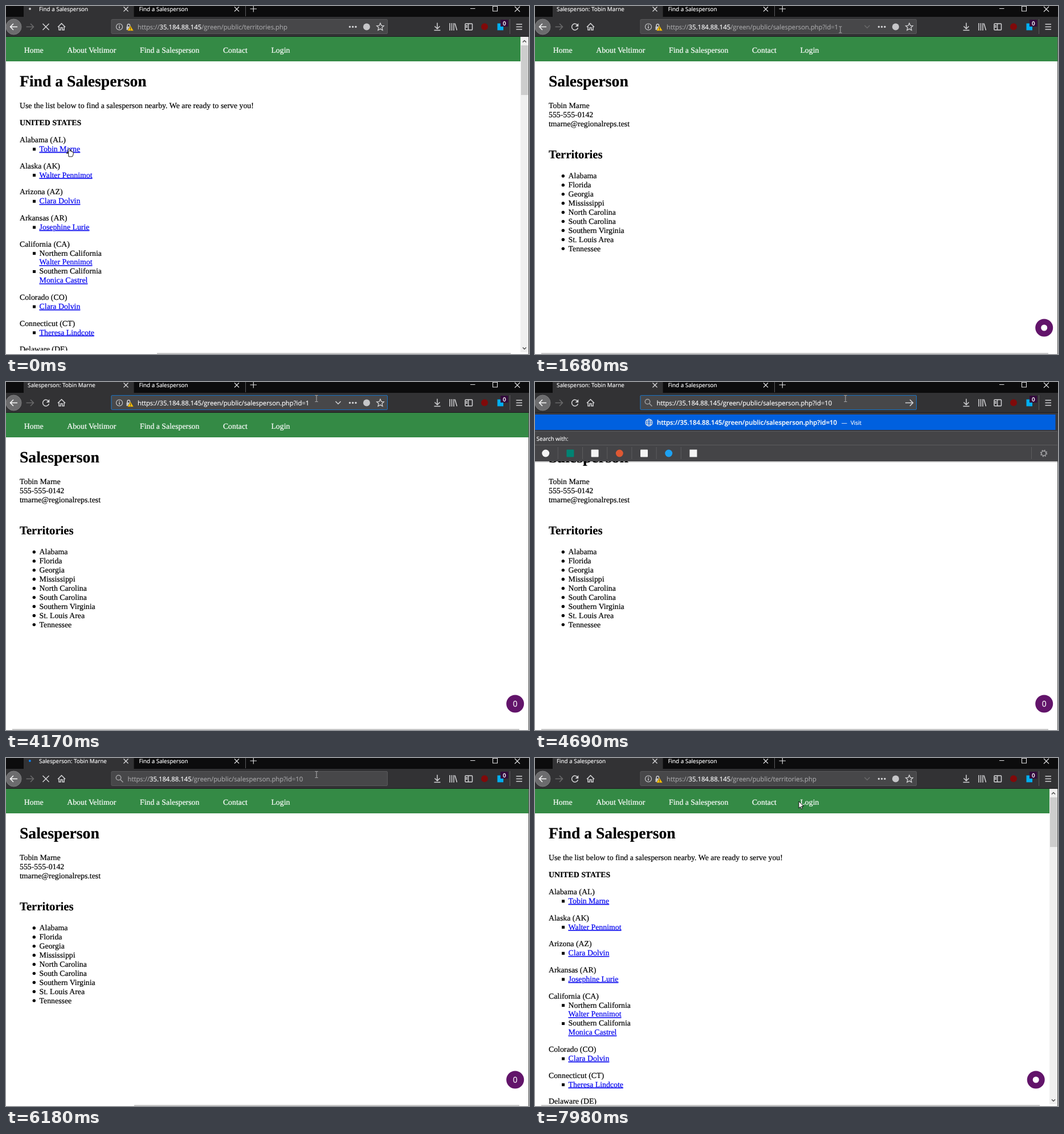
Recreate the animation shown at these times as an HTML page. Size 918 by 610 pixels, loop 8 s.

```html
<!DOCTYPE html>
<html lang="en">
<head>
<meta charset="utf-8">
<title>Find a Salesperson</title>
<style>
  html, body { margin: 0; width: 100%; height: 100%; overflow: hidden; background: #fff; }
  svg { display: block; width: 918px; height: 610px; text-rendering: geometricPrecision; }
  text { fill: currentColor; stroke: currentColor; stroke-width: .2px; }
  .page { font: 13.82px "Liberation Serif", serif; color: #000; }
  .page .nav { color: #fff; }
  .page .bold { font-weight: 700; }
  .page .h1 { font-size: 27.65px; font-weight: 700; }
  .page .h2 { font-size: 20.7px; font-weight: 700; }
  .page .link { color: #00e; text-decoration: underline; }
  .ui { font: 9.85px "Open Sans", sans-serif; color: #f9f9fa; }
  .url { font-size: 11.3px; }
  .dim { fill: #a2a2a4; stroke: #a2a2a4; }
  .line { fill: none; stroke: #d3d3d5; stroke-width: 1.5; }
  .thin { fill: none; stroke: #e4e4e6; stroke-width: 1.1; }
  .sep { stroke: #5c5c5e; }
</style>
</head>
<body>
<svg viewBox="0 0 918 610">
  <defs>
    <clipPath id="tabClip"><path d="M31 0H224.500V19H31Z"/></clipPath>
    <path id="cross" d="M-4-4 4 4M4-4-4 4"/>
    <g id="reload">
      <path class="line" d="M4.600-3A5.500 5.500 0 1 0 5.400 1.500"/>
      <path d="M6.300-6.300V-.600H.600Z" fill="#d3d3d5"/>
    </g>
    <path id="stop" class="line" d="M-5.500-5.500 5.500 5.500M5.500-5.500-5.500 5.500"/>
    <path id="chevron" class="line" d="M578.500 34 583 38.500 587.500 34"/>
  </defs>

  <g class="page">
    <path fill="#fff" d="M0 0H918V610H0Z"/>
    <g data-on="0-240 6330-8000" id="territories"></g>
    <g data-on="240-6330" id="salesperson"></g>
    <g id="badge">
      <circle r="15.500" fill="#62146a"/>
      <circle data-on="480-2410 6450-8000" r="5.500" fill="#fff"/>
      <text data-on="2410-6330" class="ui" y="5" text-anchor="middle" style="font-size:14px">0</text>
    </g>
    <path fill="#fff" d="M0 607H917V610H0Z"/>
    <path data-on="240-6330" fill="#c9c9c9" d="M11 608H901V610H11Z"/>
    <path data-on="0-240 6330-8000" fill="#c9c9c9" d="M11 608H886V610H11Z"/>
    <path data-on="0-240" fill="#fff" d="M0 604H265V610H0Z"/>
    <path data-on="6060-6330" fill="#fff" d="M0 604H225V610H0Z"/>
    <path fill="#555" d="M917 54H918V610H917Z"/>
  </g>

  <g class="ui">
    <path fill="#0c0c0d" d="M0 0H918V19H0Z"/>
    <path fill="#323234" d="M0 19H918V54H0ZM31 0H224.500V19H31Z"/>
    <path fill="#1c1c1e" d="M0 53H918V54H0Z"/>
    <g clip-path="url(#tabClip)"><circle id="burst" cx="46" cy="5" fill="#0a84ff"/></g>
    <circle id="spinner" cy="5" r="1.900"/>
    <g id="titles"></g>
    <text x="233.500" y="9.300">Find a Salesperson</text>
    <g class="thin">
      <use href="#cross" x="210.500" y="5.500"/>
      <use href="#cross" x="405" y="5.500"/>
      <path d="M428.500 5H440M434.300-1V10.500M815 4.500H823.500M854.500 0V9H862.500V.500H854.500M893 1 902 10M902 1 893 10"/>
    </g>
    <path class="sep" d="M420.500 0V18M884.500 23V49"/>

    <circle cx="13.500" cy="36.500" r="13.500" fill="#6c6c6e" stroke="#7c7c7e"/>
    <path class="line" style="stroke:#f9f9fa" d="M20 36.500H8M13 31 7.500 36.500 13 42"/>
    <path class="line" opacity=".35" d="M35.500 36.500H48M43 31 48.500 36.500 43 42"/>
    <g transform="translate(70 36.500)">
      <use href="#stop" data-on="0-240 5340-6330"/>
      <use href="#stop" data-on="240-720 6330-6830" opacity=".3"/>
      <use href="#reload" data-on="720-1200 6830-7200" opacity=".35"/>
      <use href="#reload" data-on="1200-5220 7200-8000"/>
      <path class="line" data-on="5220-5340" d="M-3 4.600A5.500 5.500 0 1 1 3 4.600"/>
    </g>
    <path class="line" d="M91 37 97.500 30.500 104 37M93 36V42H96V38H99V42H102V36"/>

    <rect x="185" y="23.500" width="484.500" height="25" rx="1.500" fill="#474749" stroke="#59595b"/>
    <rect data-on="2040-5220" x="185" y="23.500" width="484.500" height="25" rx="1.500" fill="none" stroke="#1672c4"/>

    <g data-on="0-4570 6330-8000">
      <circle class="line" style="stroke-width:1.100" cx="199" cy="36.500" r="5.500"/>
      <path class="line" d="M199 35.500V39.500M199 33V34.300"/>
      <path fill="#c8c8ca" d="M211.500 36H219V42H211.500Z"/>
      <path class="line" d="M213 36V33.500A2.300 2.300 0 0 1 217.500 33.500V36"/>
      <path d="M218.500 34.500 224 43.500H213Z" fill="#ffbf00" stroke="#474749" stroke-width=".6"/>
      <path d="M218.500 37.500V40.500M218.500 41.300V42.300" stroke="#333"/>
      <g fill="#d3d3d5"><circle cx="603.500" cy="36.500" r="1.700"/><circle cx="608.700" cy="36.500" r="1.700"/><circle cx="614" cy="36.500" r="1.700"/></g>
      <circle cx="633" cy="36.500" r="6" fill="#c6c6c8"/>
      <path class="line" style="stroke-width:1.300" d="M657 30 658.900 34.300 663.300 34.700 660 37.800 661 42.500 657 40.100 653 42.500 654 37.800 650.700 34.700 655.100 34.300Z"/>
    </g>
    <use href="#chevron" data-on="1680-1800 7980-8000" opacity=".25"/>
    <use href="#chevron" data-on="1800-4570 6330-7980"/>
    <g data-on="4570-6330" class="line" style="stroke:#a2a2a4">
      <circle cx="197.500" cy="34.500" r="4.300"/><path d="M200.700 37.700 205.500 42.500"/>
    </g>
    <path data-on="4570-5220" class="line" d="M650 36.500H663M658 31 663.500 36.500 658 42"/>

    <path data-on="2040-2410 2910-3190" fill="#0078d7" d="M231 28H527V44H231Z"/>
    <path data-on="2040-3560" fill="#0078d7" d="M527 28H533.500V44H527Z"/>
    <g class="url" id="urls"></g>
    <path data-on="3560-4170" fill="#fff" d="M533 28H534V44H533Z"/>

    <g class="line">
      <path d="M757 29.500V39.500M752.500 35.500 757 40 761.500 35.500M751.500 42.500H762.500"/>
      <path d="M779 30V43M782.500 30V43M786 30V43M788 30.500 791.500 42.500"/>
      <path d="M807 31H817.500Q818.500 31 818.500 32V41Q818.500 42 817.500 42H807Q806 42 806 41V32Q806 31 807 31ZM811.500 31V42M807 34.500H810M807 37H810"/>
      <path d="M895.500 32H906M895.500 36.500H906M895.500 41H906"/>
    </g>
    <circle cx="840" cy="36.300" r="6" fill="#800a0a"/>
    <path fill="#00aef0" d="M862.500 30.500H873V42.500H862.500Z"/>
    <path fill="#330a3c" d="M868 24H881.500V36H868Z"/>
    <text x="874.700" y="33.500" text-anchor="middle" font-weight="600">0</text>

    <g data-on="4570-5220">
      <path fill="#000" opacity=".18" d="M0 139H918V141H0Z"/>
      <path fill="#38383d" d="M0 54H918V139H0Z"/>
      <path fill="#0060df" d="M0 57H913.500V84H0Z"/>
      <path fill="#444447" d="M0 87H918V139H0Z"/>
      <path class="sep" d="M0 86.500H917M0 110.500H917M871.500 114V135"/>
      <g class="thin"><circle cx="200" cy="71" r="6"/><ellipse cx="200" cy="71" rx="2.700" ry="6"/><path d="M194 71H206M195 68H205M195 74H205"/></g>
      <text class="url" x="214" y="75.300" font-weight="600">https://35.184.88.145/green/public/salesperson.php?id=10</text>
      <text x="538" y="75">—</text><text x="554" y="75">Visit</text>
      <text x="2.500" y="103">Search with:</text>
      <g id="engines"></g>
      <circle class="line" cx="893" cy="125" r="4" style="stroke:#a8a8aa"/>
      <circle class="line" cx="893" cy="125" r="5.500" style="stroke:#a8a8aa" stroke-dasharray="2.160"/>
    </g>
  </g>

  <g id="cursor">
    <path data-on="0-240" fill="#fff" stroke="#000" stroke-width=".9" d="M-1.300 7V.800Q0-1 1.300.800V5Q3-.200 3.600 5.300 5.200 4 5.600 6 7.500 5 7.300 8 7.300 11 5.500 14H-1Q-2-.500-4 9-5 6.500-2.800 7.300L-1.300 9Z"/>
    <path data-on="240-1680 7980-8000" fill="#fff" stroke="#000" stroke-width=".9" d="M0 0V12L2.800 9.400 4.700 13.500 6.500 12.700 4.700 8.700H8.600Z"/>
    <path data-on="1680-7980" fill="none" stroke="#b4b4b6" d="M-2.500-5.500H-.500L0-5 .500-5.500H2.500M0-5V5M-2.500 5.500H-.500L0 5 .500 5.500H2.500"/>
  </g>
</svg>
<script>
const LOOP = 8000, STEP = 120, LINE = 15.92, GAP = 13.82;
const el = id => document.getElementById(id);
const text = (x, y, str, cls = '') => `<text x="${x}" y="${y}" class="${cls}">${str}</text>`;

const nav = width => `<path fill="#348a45" d="M0 54H${width}V97H0Z"/>` +
  [[31.8, 'Home'], [107.2, 'About Veltimor'], [235, 'Find a Salesperson'], [380.9, 'Contact'], [465.4, 'Login']]
    .map(([x, label]) => text(x, 82, label, 'nav')).join('');

// '-' marks a bulleted line, '@' a link, '-@' both
const states = [
  ['Alabama (AL)', '-@Tobin Marne'],
  ['Alaska (AK)', '-@Walter Pennimot'],
  ['Arizona (AZ)', '-@Clara Dolvin'],
  ['Arkansas (AR)', '-@Josephine Lurie'],
  ['California (CA)', '-Northern California', '@Walter Pennimot', '-Southern California', '@Monica Castrel'],
  ['Colorado (CO)', '-@Clara Dolvin'],
  ['Connecticut (CT)', '-@Theresa Lindcote'],
  ['Delaware (DE)']
];

function stateList() {
  let y = 239, out = '';
  for (const [state, ...rows] of states) {
    out += text(24, y, state);
    for (const row of rows) {
      y += LINE;
      if (row[0] === '-') out += `<rect x="47" y="${y - 6.4}" width="5" height="5"/>`;
      out += text(58.6, y, row.replace(/^-?@?/, ''), row.includes('@') ? 'link' : '');
    }
    y += LINE + GAP;
  }
  return out;
}

el('territories').innerHTML = nav(903) +
  text(24, 141, 'Find a Salesperson', 'h1') +
  text(24, 179.3, 'Use the list below to find a salesperson nearby. We are ready to serve you!') +
  text(24, 209.2, 'UNITED STATES', 'bold') + stateList() +
  `<path fill="#f0f0f0" d="M903 54H917V608H903Z"/><path fill="#cdcdcd" d="M904 69H916.500V156H904Z"/>
   <path fill="none" stroke="#505050" stroke-width="1.500" d="M907 63.500 910 60.500 913 63.500M907 598.500 910 601.500 913 598.500"/>`;

el('salesperson').innerHTML = nav(917) +
  text(24, 141, 'Salesperson', 'h1') +
  ['Tobin Marne', '555-555-0142', 'tmarne@regionalreps.test'].map((s, i) => text(24, 179.3 + i * LINE, s)).join('') +
  text(24, 266.5, 'Territories', 'h2') +
  ['Alabama', 'Florida', 'Georgia', 'Mississippi', 'North Carolina', 'South Carolina',
    'Southern Virginia', 'St. Louis Area', 'Tennessee'].map((s, i) => {
    const y = 302.2 + i * LINE;
    return `<circle cx="49.300" cy="${y - 4.2}" r="2.700"/>` + text(58.6, y, s);
  }).join('');

const titled = (on, x, str) => `<g data-on="${on}">${text(x, 9.3, str)}</g>`;
el('titles').innerHTML =
  titled('0-240', 58, 'Find a Salesperson') +
  titled('240-5220', 38, 'Salesperson: Tobin Marne') +
  titled('5220-6330', 58, 'Salesperson: Tobin Marne') +
  titled('6330-8000', 38, 'Find a Salesperson');

const address = (on, x, page, cls = 'dim') => `<g data-on="${on}">` + text(x, 41.2,
  `<tspan class="${cls}">https://</tspan>35.184.88.145<tspan class="${cls}">/green/public/${page}</tspan>`) + '</g>';
el('urls').innerHTML =
  address('0-240 6330-8000', 231, 'territories.php') +
  address('240-2040', 231, 'salesperson.php?id=1') +
  address('2040-4570', 231, 'salesperson.php?id=1', '') +
  address('4570-5220', 213.5, 'salesperson.php?id=10', '') +
  address('5220-6330', 213.5, 'salesperson.php?id=10');

// Search buttons: fill colour and corner radius
el('engines').innerHTML = [['#f4f4f4', 6.5], ['#008373', 1], ['#f4f4f4', 1], ['#de5833', 6.5],
  ['#f4f4f4', 1], ['#1da1f2', 6.5], ['#f4f4f4', 0]].map(([color, radius], i) => {
    const x = 18.7 + i * 43.2;
    return `<rect x="${x - 6.5}" y="118.500" width="13" height="13" rx="${radius}" fill="${color}"/>` +
      (i < 6 ? `<path class="sep" d="M${x + 21.6} 114V135"/>` : '');
  }).join('');

// Screen refreshes come in runs of 120 ms steps with still spans between them
const runs = [[0, 2160], [2410, 2410], [2910, 2910], [3190, 3190], [3560, 3920], [4170, 4170],
  [4570, 4690], [5220, 6180], [6330, 6690], [6830, 6950], [7200, 7200], [7980, 7980]];
function snap(t) {
  const [start, end] = runs.filter(run => run[0] <= t).pop();
  return Math.min(end, start + Math.floor((t - start) / STEP) * STEP);
}

const path = [[0, 111, 250], [840, 111, 250], [1680, 536, 41.5], [3440, 536, 41.5],
  [3680, 549, 31], [3920, 545, 29], [7950, 545, 29], [7980, 463, 76], [LOOP, 463, 76]];
function cursorAt(t) {
  const i = path.findIndex(p => p[0] > t);
  const [t0, x0, y0] = path[i - 1], [t1, x1, y1] = path[i];
  const k = (t - t0) / (t1 - t0), e = k * k * (3 - 2 * k);
  return [x0 + (x1 - x0) * e, y0 + (y1 - y0) * e];
}

const timed = [...document.querySelectorAll('[data-on]')].map(node =>
  [node, node.dataset.on.split(' ').map(span => span.split('-').map(Number))]);
const show = (node, on) => { node.style.display = on ? '' : 'none'; };

function draw(t) {
  for (const [node, spans] of timed) show(node, spans.some(([a, b]) => t >= a && t < b));

  el('cursor').setAttribute('transform', `translate(${cursorAt(t)})`);

  show(el('badge'), t >= 480 && t < 6330 || t >= 6450);
  el('badge').setAttribute('transform', `translate(${t < 6330 ? 893.7 : 879.2} 564)`);

  show(el('spinner'), t < 240 || t >= 5220 && t < 6330);
  el('spinner').setAttribute('cx', 46 - 6 * Math.cos(2 * Math.PI * t / 1031 + .84));
  el('spinner').setAttribute('fill', t >= 6060 ? '#0a84ff' : '#c8c8ca');

  const k = (t - (t < 3000 ? 295 : 6385)) / 375;
  show(el('burst'), k >= 0 && k < 1);
  el('burst').setAttribute('r', Math.max(0, 3.5 + 140 * k));
  el('burst').setAttribute('opacity', .6 - .5 * k);
}

let begin;
function tick(now) {
  begin ??= now;
  draw(snap((now - begin) % LOOP));
  requestAnimationFrame(tick);
}
draw(0);
requestAnimationFrame(tick);
</script>
</body>
</html>
```
